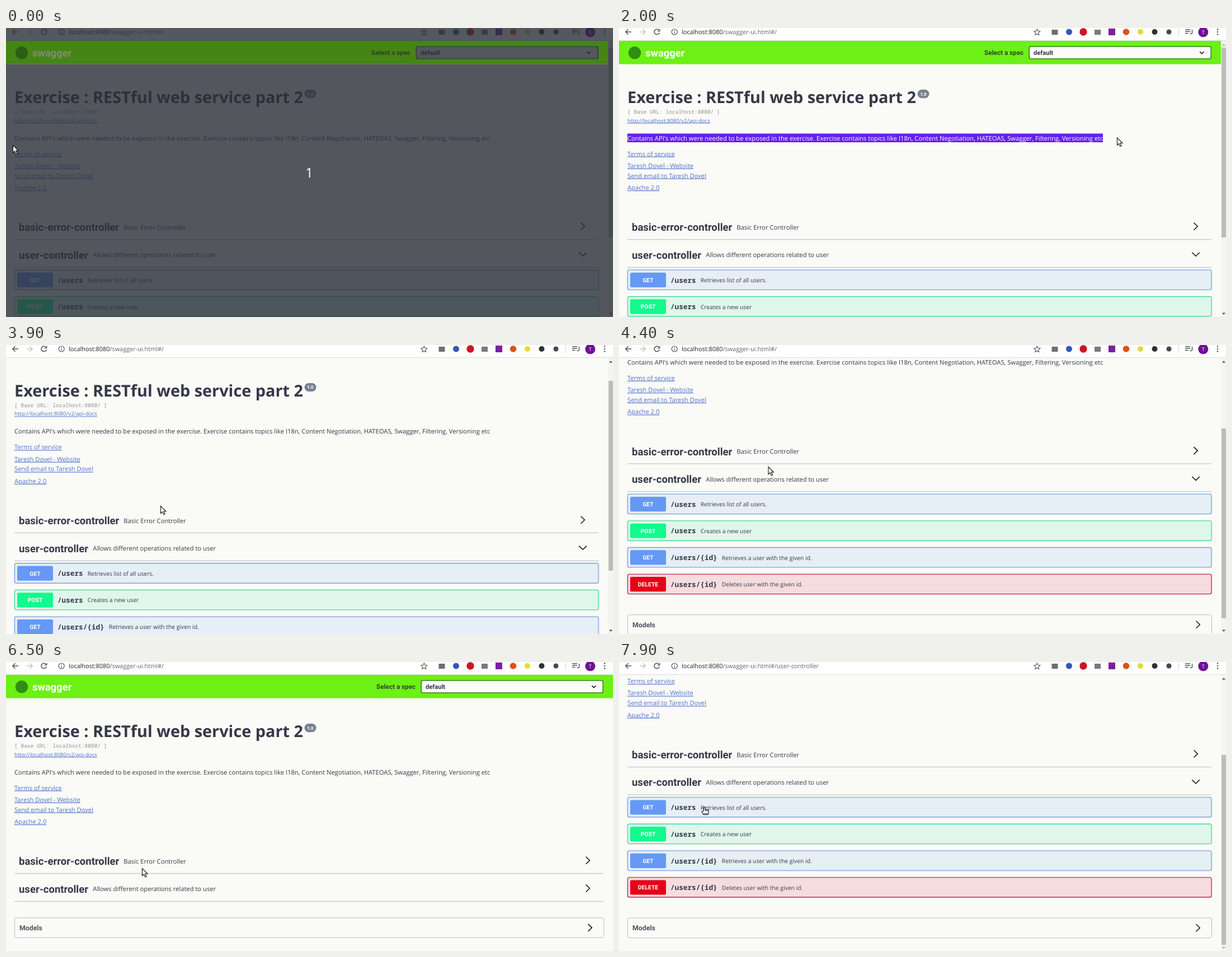
Write an HTML page that moves like this. It is 1085x516 px and loops after 8 s.

```html
<!DOCTYPE html>
<html lang="en">
<head>
<meta charset="utf-8">
<title>API docs</title>
<style>
  html, body { margin: 0; width: 100%; height: 100%; overflow: hidden; background: #fafbf7; }
  svg { display: block; }
  text { font-family: "Open Sans", sans-serif; font-size: 11.21px; fill: #363849; white-space: pre; text-rendering: geometricPrecision; }
  .b { font-family: Roboto, sans-serif; font-weight: 700; }
  .mono { font-family: "Noto Sans Mono", monospace; }
  .link { fill: #4f71cc; text-decoration: underline; }
  .mid { text-anchor: middle; }
  .line { fill: none; stroke: #111; stroke-width: 1.5; }
  .ico { fill: none; stroke: #50545a; stroke-width: 1.5; }
</style>
</head>
<body>
<svg id="stage" width="1085" height="516" viewBox="0 0 1085 516"></svg>
<script>
const LOOP = 8000, MAX_SCROLL = 190.3, ROW = 47.66;
const ABOUT = "Contains API's which were needed to be exposed in the exercise. Exercise contains topics like I18n, Content Negotiation, HATEOAS, Swagger, Filtering, Versioning etc";

const text = (x, y, s, cls = '', style = '') => `<text x="${x}" y="${y}" class="${cls}" style="${style}">${s}</text>`;
const rect = (x, y, w, h, fill, more = '') => `<rect x="${x}" y="${y}" width="${w}" height="${h}" fill="${fill}" ${more}/>`;
const dot = (x, y, r, fill) => `<circle cx="${x}" cy="${y}" r="${r}" fill="${fill}"/>`;
const path = (d, cls, more = '') => `<path d="${d}" class="${cls}" ${more}/>`;
const link = (y, s, size = 11.21) => text(15, y, s, 'link', `font-size:${size}px`);
const right = (x, y) => path(`M${x - 3.5} ${y - 6.5}l6.8 6.5-6.8 6.5`, 'line');
const down = (x, y) => path(`M${x - 6.8} ${y - 3.3}l6.8 6.6 6.8-6.6`, 'line');
const rule = y => rect(15, y, 1044, 1, '#b9babd', 'class="wide"');

const KINDS = {
  GET: ['#6599f5', '#e6eef6', '#6c9ae6'],
  POST: ['#12fa8e', '#dff7ea', '#2fe092'],
  DELETE: ['#e60019', '#f5dcde', '#c50a36']
};
function row(i, kind, route, note) {
  const [main, back, edge] = KINDS[kind], y = 432 + i * ROW;
  return rect(15.5, y, 1043.5, 35.2, 'none', 'rx="3" stroke="#000" stroke-opacity=".07" stroke-width="3.200"')
    + rect(15.5, y, 1043.5, 35.2, back, `rx="3" stroke="${edge}" stroke-width="1.1"`)
    + rect(20, y + 4.7, 64, 26.2, main, 'rx="2.5"')
    + text(52, y + 21.7, kind, 'b mid', 'font-size:10.4px;fill:#fff')
    + text(92, y + 22.5, route, 'mono', 'font-size:12.7px;font-weight:600')
    + text(100 + route.length * 7.62, y + 21.9, note, '', 'font-size:10.33px');
}

const toolbar = rect(0, 0, 1085, 22, '#fff') + rect(0, 22, 1085, 1, '#dcdddb')
  + path('M22 7H12M16.500 2.300L11.800 7l4.700 4.700', 'ico')
  + path('M37 7h10M42.500 2.300L47.200 7l-4.700 4.700', 'ico', 'style="stroke:#c3c5c8"')
  + path('M71.300 3.700A4.700 4.700 0 1 0 72.300 8.200M72.700 1.800v3.800h-3.800', 'ico')
  + path('M94.200 7a5 5 0 1 0 10 0a5 5 0 1 0-10 0M99.200 6.300v3.500M99.200 4v1.300', 'ico', 'style="stroke-width:1.200"')
  + '<text x="112" y="11" style="font-size:10.9px;fill:#202124">localhost:8080<tspan id="url" fill="#5f6368"></tspan></text>'
  + path('M747.300 2l1.600 3.600 3.900.400-2.900 2.600.800 3.900-3.400-2-3.400 2 .800-3.900-2.900-2.600 3.900-.400z', 'ico', 'style="stroke-width:1.100"')
  + rect(773.5, 3, 11, 9, '#6c6f70') + dot(804.5, 7, 5.5, '#3358b8') + dot(830, 7, 6.7, '#cf1426')
  + rect(850, 3, 11, 9, '#777b7e') + rect(875, 1, 12, 12, '#7a1fa0') + dot(906.5, 7, 5.8, '#d8531b')
  + dot(932, 7, 5, '#e6d93c') + dot(957.5, 7, 5, '#2e3033') + dot(983, 7, 4.5, '#46494c')
  + rect(1000, 1, 1, 13, '#d0d2d4')
  + path('M1012 3h9M1012 6.300h9M1012 9.600h5.500M1024.500 3v7M1020.500 10.300h3.500', 'ico')
  + dot(1044.3, 7.3, 9, '#6f1097') + text(1044.3, 10.6, 'T', 'mid', 'font-size:9px;fill:#fff')
  + [2.5, 7, 11.5].map(y => dot(1070, y, 1.3, '#50545a')).join('');

const header = rect(0, 23, 1085, 41.6, '#6df015')
  + dot(28, 44.3, 11.2, '#2f8f13') + text(47, 51, 'swagger', 'b', 'font-size:18.4px;fill:#fff')
  + '<g class="shift">' + text(653, 48.4, 'Select a spec', 'b', 'font-size:11.7px;fill:#32452f')
  + rect(733.2, 33, 325, 22, '#fbfcfa', 'rx="3" stroke="#3c7d10" stroke-width="1.6"')
  + text(741, 48, 'default', 'b', 'font-size:11.1px')
  + path('M1038.200 42.300l3.600 3.600 3.600-3.600', 'line') + '</g>';

const page = header
  + text(15, 134, 'Exercise : RESTful web service part 2', '', 'font-size:28.85px;font-weight:700')
  + rect(533.5, 110, 21, 15.2, '#7b8090', 'rx="7.600"')
  + text(544, 120.6, '1.0', 'mid', 'font-size:7.9px;font-weight:700;fill:#fff')
  + text(15, 153, '[ Base URL: localhost:8080/ ]', 'mono', 'font-size:9.53px;fill:#8f9098')
  + link(168.5, 'http://localhost:8080/v2/api-docs', 9.6)
  + text(15, 200.5, ABOUT)
  + '<g clip-path="url(#marked)">' + rect(15, 188.5, 850, 15.5, '#6420ef')
  + text(15, 200.5, ABOUT, '', 'fill:#fff') + '</g>'
  + link(228.5, 'Terms of service') + link(249.8, 'Taresh Dovel - Website')
  + link(267.6, 'Send email to Taresh Dovel') + link(289, 'Apache 2.0')
  + text(23, 362.3, 'basic-error-controller', 'b', 'font-size:18.5px') + text(210.3, 360, 'Basic Error Controller')
  + rule(377.2)
  + rect(15, 382, 1044, 45, '#f2f2f0', 'class="wide" id="hover"')
  + text(23, 411.8, 'user-controller', 'b', 'font-size:18.5px') + text(155.3, 409.3, 'Allows different operations related to user')
  + rule(426.9)
  + '<g class="shift">' + right(1031, 354.3)
  + `<g id="open">${down(1031, 404)}</g><g id="shut">${right(1031, 404)}</g></g>`
  + '<g id="rows">' + row(0, 'GET', '/users', 'Retrieves list of all users.')
  + row(1, 'POST', '/users', 'Creates a new user')
  + row(2, 'GET', '/users/{id}', 'Retrieves a user with the given id.')
  + row(3, 'DELETE', '/users/{id}', 'Deletes user with the given id.') + '</g>'
  + '<g id="models">' + rect(15.5, 647.3, 1044, 35.5, 'none', 'class="wide" rx="3" stroke="#bcbdc1"')
  + text(24, 669.7, 'Models', 'b', 'font-size:12.3px;fill:#505360')
  + `<g class="shift">${right(1035, 665)}</g></g>`;

const bar = '<g id="bar">' + rect(1076, 23, 9, 493, '#f4f4f2')
  + rect(1077, 35, 8, 339, '#bcbdba', 'id="thumb"')
  + path('M1078 31.500h6l-3-3.500z', '', 'id="up"') + path('M1078 508.500h6l-3 3.500z', '', 'id="low"') + '</g>';

const cursors = '<g id="cursor">'
  + path('M0 0v13.200l3-2.800 2.300 5 2.300-1-2.300-4.900h4.200z', '', 'id="arrow" fill="#fff" stroke="#111" stroke-width="1.100"')
  + path('M-2.500-7.500q2.500 0 2.500 1.500v12q0 1.500-2.500 1.500M2.500-7.500q-2.500 0-2.500 1.500v12q0 1.500 2.500 1.500', 'line', 'id="beam" style="stroke-width:1.100"')
  + path('M-1.500 7V1q0-1.200 1.200-1.200T1 1v4h4q2 0 2 2v3.500l-1 3H-2L-5 9q0-2 1.700-1.300zM2.500 5v2.500M5 5.200v2.300M-2 11.700h7.500', '', 'id="hand" fill="#fff" stroke="#111" stroke-width="1.100" stroke-linejoin="round"')
  + '</g>';

// The shade is thinner over the green band, but not over its select box.
const band = 'M0 23h1076v41.600H0zM733 33h326v22h-326z';
const countdown = '<g id="dim" fill-rule="evenodd">'
  + path(`M0 0h1085v516H0z${band}`, '', 'fill="#2a2f38" opacity=".8"')
  + path(band, '', 'fill="#2c3f17" opacity=".6"')
  + text(542, 267, '1', 'mid', 'font-size:24px;fill:#fff') + '</g>';

const stage = document.getElementById('stage');
stage.innerHTML = '<defs><clipPath id="view"><rect y="23" width="1085" height="493"/></clipPath>'
  + '<clipPath id="marked"><rect id="sel" x="15" y="180" width="0" height="30"/></clipPath></defs>'
  + rect(0, 0, 1085, 516, '#fafbf7')
  + `<g clip-path="url(#view)"><g id="page">${page}</g></g>` + bar + toolbar + countdown + cursors;

const $ = id => document.getElementById(id);
const show = (id, on) => { $(id).style.display = on ? '' : 'none'; };
const move = (el, x, y) => el.setAttribute('transform', `translate(${x} ${y})`);

// Each key: time, then values; linear in between.
const SCROLL = [[3400, 0], [3600, 42.1], [4100, 42.1], [4300, 128], [4400, 165.7], [4500, 168.5],
  [4900, 168.5], [5200, MAX_SCROLL], [5800, MAX_SCROLL], [5900, 0], [6900, 0], [7000, 36.6], [7400, 178], [7500, MAX_SCROLL]];
const CURSOR = [[800, 12.5, 209.5], [1000, 16, 197], [1700, 790, 197], [1800, 838, 197], [1900, 838, 197], [2000, 890.5, 196],
  [2600, 890.5, 196], [2900, 286, 287.5], [3100, 286, 287.5], [3300, 276.5, 287.5], [4100, 276.5, 287.5], [4400, 267, 217.5],
  [4800, 267, 217.5], [5700, 201, 211], [6000, 201, 211], [6600, 252, 400], [6800, 252, 400], [7000, 288, 310],
  [7400, 300, 254], [7600, 300, 254], [7900, 153, 259]];

function at(keys, t) {
  const i = keys.findIndex(k => k[0] >= t);
  if (i < 0) return keys[keys.length - 1].slice(1);
  if (i === 0) return keys[0].slice(1);
  const a = keys[i - 1], b = keys[i], p = (t - a[0]) / (b[0] - a[0]);
  return a.slice(1).map((v, n) => v + (b[n + 1] - v) * p);
}

function draw(t) {
  const [scroll] = at(SCROLL, t), [x, y] = at(CURSOR, t);
  const shut = t >= 5900 && t < 6800, extra = shut ? 9 : 0;

  move($('page'), 0, -scroll);
  document.querySelectorAll('.wide').forEach(e => { e.style.width = 1044 + extra + 'px'; });
  document.querySelectorAll('.shift').forEach(e => move(e, extra, 0));
  move($('models'), 0, shut ? -4 * ROW : 0);
  show('rows', !shut);
  show('open', !shut);
  show('shut', shut);
  show('bar', !shut);
  move($('thumb'), 0, scroll * 0.688);
  $('up').style.fill = scroll > 0 ? '#505050' : '#a8a8a8';
  $('low').style.fill = scroll < MAX_SCROLL ? '#505050' : '#a8a8a8';
  $('url').textContent = '/swagger-ui.html#/' + (t >= 6800 ? 'user-controller' : '');

  const marked = t < 1000 || t >= 3800 ? 0 : t >= 2000 ? 850 : x - 15;
  $('sel').setAttribute('width', marked);

  const onTag = y + scroll > 387 && y + scroll < 428;
  show('hover', onTag && (t < 5900 || (t > 6100 && t < 6900)));
  const beam = t >= 900 && t < 2000;
  const hand = t >= 6900 || (t >= 5000 && t < 6100) || (t >= 6100 && onTag);
  show('beam', beam);
  show('hand', hand);
  show('arrow', !beam && !hand);
  move($('cursor'), x, y);

  show('dim', t < 600);
  $('dim').style.opacity = t < 500 ? 1 : 0.45;
}

function tick() {
  draw(Math.floor(performance.now() % LOOP / 100) * 100);
  requestAnimationFrame(tick);
}
tick();
</script>
</body>
</html>
```
